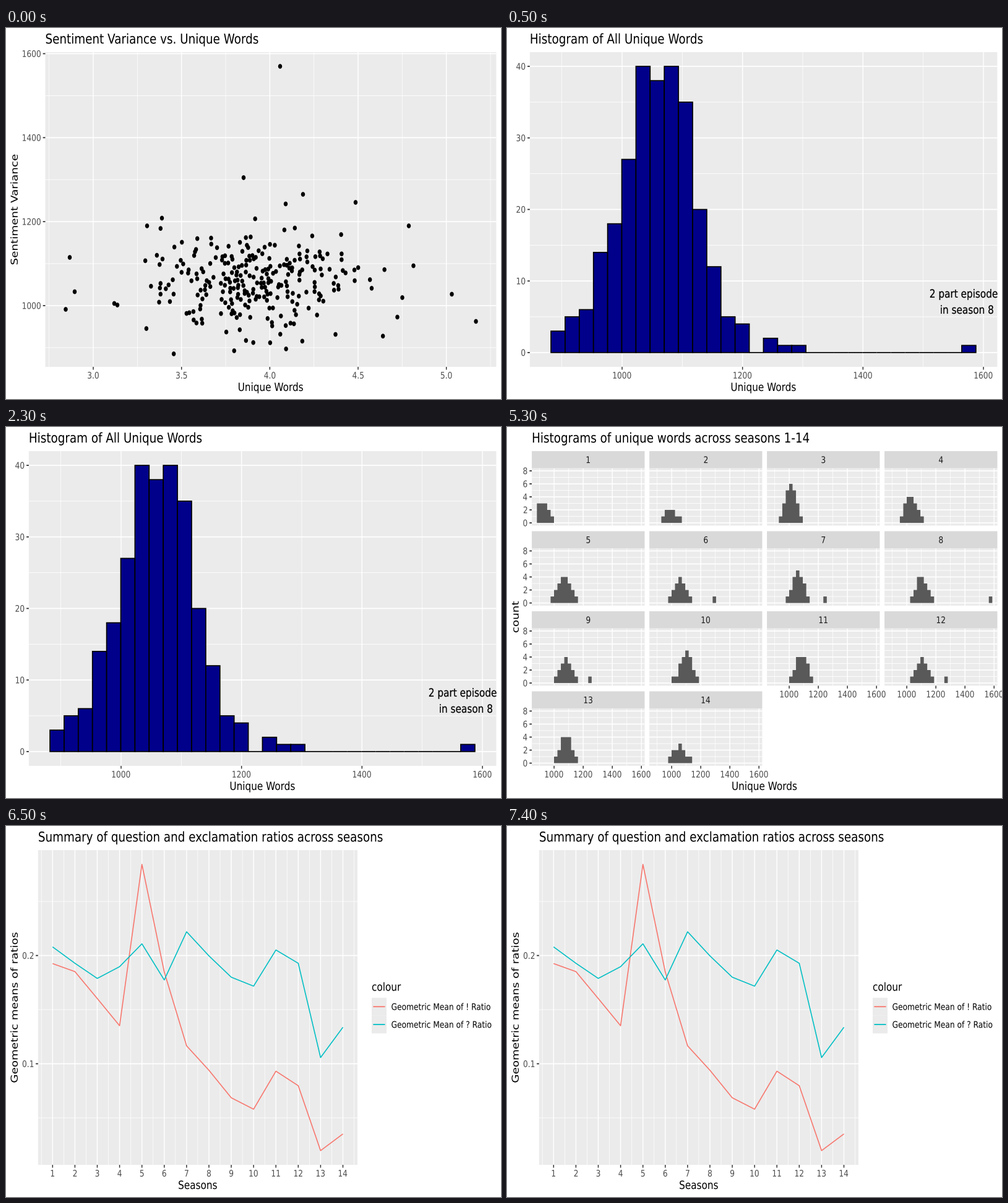
A matplotlib script that plays this animation: 800 px wide and 600 px high, repeating every 8 s.

```python
import numpy as np
import matplotlib
import matplotlib.pyplot as plt
from matplotlib.animation import FuncAnimation
from matplotlib.collections import EllipseCollection
from matplotlib.patches import PathPatch, Rectangle
from matplotlib.textpath import TextPath
from matplotlib.transforms import Affine2D

matplotlib.rcParams["path.snap"] = False

W, H, DPI = 800, 600, 100
PX = 72 / DPI              # one pixel in points
SQUEEZE = 5 / 6            # every chart is a 960 x 600 page narrowed to 800
BIG, MID, SMALL = 22, 18.33, 14.67
TOP, BOTTOM, RIGHT = 39, 548, 792.4
THICK, THIN = 1.78, 0.89
PANEL, STRIP, TICK, LABEL = "#EBEBEB", "#D9D9D9", "#333333", "#4D4D4D"

# Histogram of words per episode: the main hump, then a sparse tail
BIN0, BIN_W, N_BINS = 881.9, 23.52, 30
EDGES = BIN0 + BIN_W * np.arange(N_BINS + 1)
HUMP = [3, 5, 6, 14, 18, 27, 40, 38, 40, 35, 20, 12, 5, 4]
TAIL = {15: 2, 16: 1, 17: 1, 29: 1}

# Each season is a bell: centre bin and height, plus a few stray episodes
CENTRES = [1.3, 4.3, 5, 5.7, 7.5, 7.1, 7.2, 8.8, 8, 8.7, 8.2, 9, 8, 6.8]
PEAKS = [3.3, 2, 5.5, 4, 4.3, 3.8, 4.6, 4, 3.7, 4.6, 4.4, 3.8, 4.5, 2.6]
SPREAD = 1.8
STRAYS = {6: 17, 7: 15, 8: 29, 9: 15, 12: 16}

# Scatter points far from the central cloud, in pixels
OUTLIERS = [
    (443, 62), (384, 242), (480, 269), (452, 284.5), (565, 282),
    (252, 307.5), (228, 320), (651, 320), (658.5, 384.5), (640.5, 436),
    (632.5, 467.5), (720.5, 430.5), (759.5, 474.5), (103, 371),
    (111, 426.5), (96.5, 455), (175, 445.5), (180, 448),
]


def total_counts():
    counts = np.zeros(N_BINS, int)
    counts[:len(HUMP)] = HUMP
    for k, n in TAIL.items():
        counts[k] = n
    return counts


def season_counts(season):
    dist = (np.arange(N_BINS) - CENTRES[season - 1]) / SPREAD
    counts = np.round(PEAKS[season - 1] * np.exp(-dist ** 2 / 2))
    if season in STRAYS:
        counts[STRAYS[season]] = 1
    return counts


def linear(v0, p0, v1, p1):
    """Map values to pixels through two known positions."""
    return lambda v: p0 + (np.asarray(v) - v0) * (p1 - p0) / (v1 - v0)


def new_slide(fig):
    ax = fig.add_axes([0, 0, 1, 1])
    ax.axis("off")
    return ax


def text(ax, x, y, s, size, color="black", align="center", rot=0, weight=0):
    """Text with its baseline at y (at x when upright)."""
    path = TextPath((0, 0), s, size=size)
    box = path.get_extents()
    shift = {"left": 0, "center": (box.x0 + box.x1) / 2, "right": box.x1}[align]
    move = (Affine2D().translate(-shift, 0).rotate_deg(rot)
            .scale(SQUEEZE, -1).translate(x, y))
    ax.add_patch(PathPatch(move.transform_path(path), fc=color, ec=color,
                           lw=weight * PX, zorder=3))


def rect(ax, x, y, w, h, color, edge="none", lw=0, z=1):
    ax.add_patch(Rectangle((x, y), w, h, fc=color, ec=edge, lw=lw * PX,
                           zorder=z))


def rule_v(ax, xs, y0, y1, color, lw, z=2):
    ax.vlines(xs, y0, y1, colors=color, lw=lw * SQUEEZE * PX, zorder=z)


def rule_h(ax, ys, x0, x1, color, lw, z=2):
    ax.hlines(ys, x0, x1, colors=color, lw=lw * PX, zorder=z)


def panel(ax, x0, y0, x1, y1, xs, ys, x_minor, y_minor):
    """Grey background with its grid, all below the data."""
    rect(ax, x0, y0, x1 - x0, y1 - y0, PANEL, z=0)
    for vs, hs, lw, z in ((x_minor, y_minor, THIN, 0.4), (xs, ys, THICK, 0.5)):
        rule_h(ax, hs, x0, x1, "white", lw, z)
        rule_v(ax, vs, y0, y1, "white", lw, z)


def x_axis(ax, xs, labels, y):
    rule_v(ax, xs, y, y + 4.6, TICK, THICK)
    for x, s in zip(xs, labels):
        text(ax, x, y + 18.9, str(s), SMALL, LABEL)


def y_axis(ax, ys, labels, x):
    rule_h(ax, ys, x - 3.8, x, TICK, THICK)
    for y, s in zip(ys, labels):
        text(ax, x - 7.6, y + 5.35, str(s), SMALL, LABEL, "right")


def titles(ax, left, right, title, x_title, y_title=None, y_mid=293.5):
    text(ax, left, 25.2, title, BIG, align="left")
    text(ax, (left + right) / 2, 587, x_title, MID)
    if y_title:
        text(ax, 18.8, y_mid, y_title, MID, rot=90)


def cloud(py):
    """Points whose heights follow the histogram and whose x is normal."""
    rng = np.random.default_rng(14)
    pts = list(OUTLIERS)
    edges = py(EDGES)
    for low, high, total in zip(edges, edges[1:], total_counts()):
        used = sum(high < y <= low for _, y in OUTLIERS)
        for _ in range(total - used):
            for _ in range(30):
                x, y = rng.normal(397, 80), rng.uniform(high, low)
                gap = min(np.hypot(x - a, y - b) for a, b in pts)
                if 205 < x < 615 and gap > 4:
                    pts.append((x, y))
                    break
    return pts


def scatter_slide(ax):
    left = 63.5
    px, py = linear(3, 141, 5, 711.7), linear(1000, 449, 1600, 41.5)
    xv, yv = np.arange(3, 5.1, 0.5), np.arange(1000, 1601, 200)
    panel(ax, left, TOP, RIGHT, BOTTOM, px(xv), py(yv),
          px(np.arange(2.75, 5.3, 0.5)), py(yv - 100))
    ax.add_collection(EllipseCollection(
        [7.7 * SQUEEZE], [7.7], [0], units="xy", offsets=cloud(py),
        offset_transform=ax.transData, fc="black", ec="none"))
    x_axis(ax, px(xv), [f"{v:.1f}" for v in xv], BOTTOM)
    y_axis(ax, py(yv), yv, left)
    titles(ax, left, RIGHT, "Sentiment Variance vs. Unique Words",
           "Unique Words", "Sentiment Variance")


def histogram_slide(ax):
    left = 36.9
    px, py = linear(1000, 186, 1600, 770), linear(0, 524.9, 40, 62)
    xv, yv = np.arange(1000, 1601, 200), np.arange(0, 41, 10)
    panel(ax, left, TOP, RIGHT, BOTTOM, px(xv), py(yv),
          px(xv - 100), py(yv[:-1] + 5))
    edges = px(EDGES)
    for x, n in zip(edges, total_counts()):
        rect(ax, x, py(n), edges[1] - edges[0], py(0) - py(n),
             "#00008B", "black", 1.7)
    text(ax, 738.2, 436, "2 part episode", MID, weight=0.2)
    text(ax, 743.5, 462, "in season 8", MID, weight=0.2)
    x_axis(ax, px(xv), xv, BOTTOM)
    y_axis(ax, py(yv), yv, left)
    titles(ax, left, RIGHT, "Histogram of All Unique Words", "Unique Words")


def facet_slide(ax):
    left, wide, strip, tall = 40.1, 182.35, 27.7, 120.4
    seasons = len(CENTRES)
    xv, yv = np.arange(1000, 1601, 200), np.arange(0, 9, 2)
    for i in range(seasons):
        row, col = divmod(i, 4)
        x0, y0 = left + 190 * col, TOP + 129.5 * row
        x1, y1 = x0 + wide, y0 + tall
        px = linear(1000, x0 + 36, 1600, x0 + 177.1)
        py = linear(0, y1 - 4.3, 8, y0 + strip + 4.2)
        panel(ax, x0, y0 + strip, x1, y1, px(xv), py(yv),
              px(xv - 100), py(yv[:-1] + 1))
        ax.stairs(py(season_counts(i + 1)), px(EDGES), baseline=float(py(0)),
                  fill=True, color="#595959", lw=0)
        rect(ax, x0, y0, wide, strip, STRIP)
        text(ax, (x0 + x1) / 2, y0 + 19.2, str(i + 1), SMALL, "#1A1A1A")
        if col == 0:
            y_axis(ax, py(yv), yv, x0)
        if i + 4 >= seasons:
            x_axis(ax, px(xv), xv, y1)
    titles(ax, left, RIGHT, "Histograms of unique words across seasons 1-14",
           "Unique Words", "count", 307)


def ratio_slide(ax):
    left, right = 51.9, 568
    red, teal = "#F8766D", "#00BFC4"
    px, py = linear(1, 75.3, 14, 544.5), linear(0.1, 384.5, 0.2, 209.5)
    xv, yv = np.arange(1, 15), np.array([0.1, 0.2])
    panel(ax, left, TOP, right, BOTTOM, px(xv), py(yv),
          px(np.arange(0.5, 15)), py([0.05, 0.15, 0.25]))
    marks = [222.5, 235.5, 279, 323, 62, 236, 355.5,
             395, 439.5, 458, 396.5, 420, 525, 498]
    asks = [195.5, 222, 246.5, 227.5, 190.5, 249, 171,
            210, 244.5, 259, 200.5, 222, 374.5, 325.5]
    for ys, color in ((marks, red), (asks, teal)):
        ax.plot(px(xv), ys, color=color, lw=1.6 * PX, solid_capstyle="butt")
    x_axis(ax, px(xv), xv, BOTTOM)
    y_axis(ax, py(yv), yv, left)
    titles(ax, left, right,
           "Summary of question and exclamation ratios across seasons",
           "Seasons", "Geometric means of ratios")

    text(ax, 591, 266.5, "colour", MID, align="left")
    for k, (mark, color) in enumerate((("!", red), ("?", teal))):
        y = 277.8 + 28.8 * k
        rect(ax, 591, y, 24, 28.8, PANEL)
        rule_h(ax, y + 14.4, 593.4, 612.6, color, THICK)
        text(ax, 622.6, y + 19.7, f"Geometric Mean of {mark} Ratio", SMALL,
             align="left")


STEP = 500
STARTS = [0, 500, 3500, 6500]
DRAW = [scatter_slide, histogram_slide, facet_slide, ratio_slide]

fig = plt.figure(figsize=(W / DPI, H / DPI), dpi=DPI, facecolor="white")
slides = []
for draw in DRAW:
    slide = new_slide(fig)
    draw(slide)
    slide.set(xlim=(0, W), ylim=(H, 0))
    slides.append(slide)


def show(i):
    current = sum(i * STEP >= t for t in STARTS) - 1
    for k, ax in enumerate(slides):
        ax.set_visible(k == current)
    return slides


anim = FuncAnimation(fig, show, frames=8000 // STEP, interval=STEP,
                     repeat=True, repeat_delay=0, blit=False)
plt.show()
```
